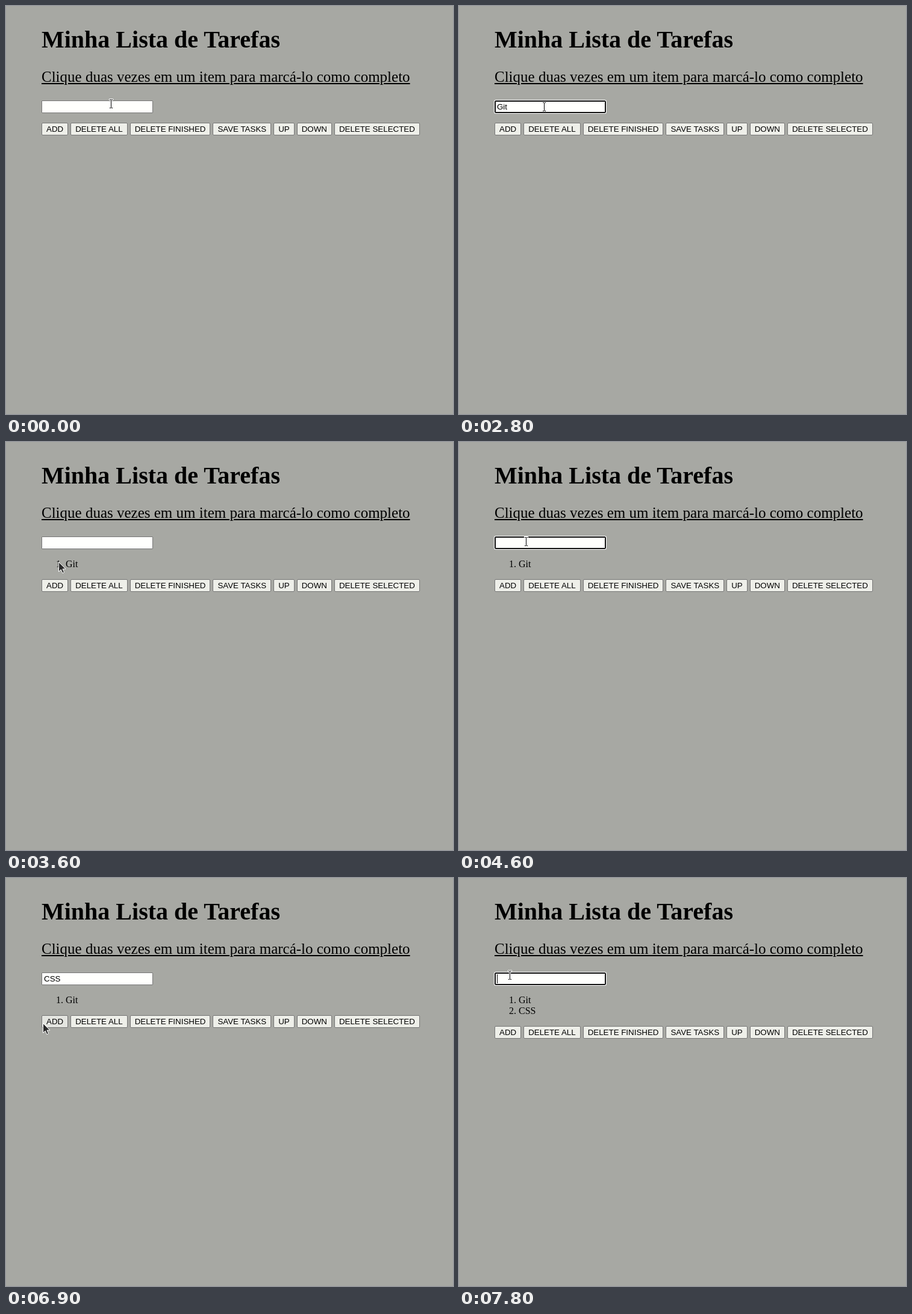
An HTML page for the animation above (8 s loop, 742x678 px).

```html
<!DOCTYPE html>
<html lang="pt-BR">
<head>
<meta charset="utf-8">
<title>Minha Lista de Tarefas</title>
<style>
  html, body { margin: 0; width: 100%; height: 100%; overflow: hidden; background: #a7a8a3; }
  body { position: relative; color: #000; font: 16px/18px "Liberation Serif", serif; }
  h1, .hint, .app, svg { position: absolute; margin: 0; white-space: nowrap; }
  h1 { left: 59px; top: 32px; font-size: 40px; line-height: 47px; }
  .hint { left: 59px; top: 104px; font-size: 25px; line-height: 28px; text-decoration: underline; }
  .app { left: 59px; top: 157px; }
  .field, .button {
    box-sizing: border-box; height: 21px; border: 1px solid #767676;
    font: 13.3333px/15px "Liberation Sans", sans-serif;
  }
  .field { position: relative; width: 185px; padding: 2px 3px; background: #fffffd; border-radius: 1px; }
  .field.focus { border-color: #101010; border-radius: 2px; box-shadow: inset 0 0 0 1px #101010; }
  .field.focus.halo { box-shadow: inset 0 0 0 1px #101010, 0 0 0 1px #fff; }
  .caret { position: absolute; top: 2px; width: 1px; height: 15px; background: #000; }
  ol { margin: 16px 0; padding-left: 40px; }
  .row { display: flex; gap: 4px; }
  .button { padding: 2px 7px; background: #eeefe9; border-radius: 2px; }
  .button.hover { background: #e4e5e0; }
  svg { left: 0; top: 0; overflow: visible; }
</style>
</head>
<body>
<h1>Minha Lista de Tarefas</h1>
<p class="hint">Clique duas vezes em um item para marcá-lo como completo</p>
<div class="app">
  <div class="field"><span class="typed"></span><i class="caret"></i></div>
  <ol></ol>
  <div class="row"></div>
</div>
<svg width="742" height="678">
  <g id="beam" shape-rendering="crispEdges">
    <path fill="#fff" d="M-3-8h7v3h-2v11h2v3h-7v-3h2v-11h-2z"/>
    <path fill="#000" d="M-2-7h2v1h1v-1h2v1h-2v13h2v1h-2v-1h-1v1h-2v-1h2v-13h-2z"/>
  </g>
  <path id="arrow" fill="#2b2b2b" stroke="#fff" d="M.5.5V16.5L4.2 13 6.8 18.8 9.6 17.6 7 12H12Z"/>
</svg>
<script>
const LOOP = 8000;
const find = selector => document.querySelector(selector);
const field = find('.field'), typed = find('.typed'), caret = find('.caret');
const list = find('ol'), row = find('.row');
const cursors = { beam: find('#beam'), arrow: find('#arrow') };

for (const label of ['ADD', 'DELETE ALL', 'DELETE FINISHED', 'SAVE TASKS', 'UP', 'DOWN', 'DELETE SELECTED']) {
  const button = document.createElement('div');
  button.className = 'button';
  button.textContent = label;
  row.append(button);
}
const addButton = row.firstChild;

// Every track holds its value until the next time.
const pointer = [
  [0, 'beam', 174, 162], [400, 'beam', 141, 167],
  [3000, 'beam', 136, 170], [3100, 'arrow', 115, 184], [3200, 'arrow', 94, 196],
  [3300, 'arrow', 87, 199], [3700, 'arrow', 92, 188], [3800, 'arrow', 102, 163],
  [3900, 'beam', 111, 164], [4100, 'beam', 111, 163], [4500, 'beam', 111, 165],
  [6200, 'arrow', 87, 184], [6300, 'arrow', 63, 205], [6400, 'arrow', 56, 222],
  [6500, 'arrow', 57, 235], [6600, 'arrow', 60, 240], [6700, 'arrow', 61, 241],
  [7100, 'arrow', 63, 233], [7200, 'arrow', 68, 214], [7300, 'arrow', 76, 190],
  [7400, 'beam', 82, 168], [7500, 'beam', 84, 161], [7600, 'beam', 84, 159],
  [7800, 'beam', 84, 161]
];
const text = [
  [0, ''], [1900, 'G'], [2100, 'Gi'], [2200, 'Git'], [3500, ''],
  [5300, 'CS'], [5400, 'CSS'], [7000, '']
];
const focus = [
  [0, ''], [400, 'focus'], [1000, 'focus halo'], [3400, ''],
  [4100, 'focus halo'], [6900, ''], [7500, 'focus halo']
];
const caretOn = [
  [0, false], [400, true], [1000, false], [1800, true], [2800, false],
  [4100, true], [4600, false], [5300, true], [6000, false], [7500, true]
];
const tasks = [[0], [3500, 'Git'], [7000, 'Git', 'CSS']];

const at = (track, time) => track.findLast(([start]) => start <= time).slice(1);

function draw(time) {
  const [kind, x, y] = at(pointer, time);
  for (const name in cursors) cursors[name].style.display = name === kind ? '' : 'none';
  cursors[kind].setAttribute('transform', `translate(${x} ${y})`);

  typed.textContent = at(text, time)[0];
  field.className = 'field ' + at(focus, time)[0];
  caret.hidden = !at(caretOn, time)[0];
  caret.style.display = caret.hidden ? 'none' : '';
  caret.style.left = 3 + Math.floor(typed.getBoundingClientRect().width) + 'px';

  const items = at(tasks, time);
  if (list.children.length !== items.length) {
    list.replaceChildren(...items.map(item => {
      const entry = document.createElement('li');
      entry.textContent = item;
      return entry;
    }));
  }

  const box = addButton.getBoundingClientRect();
  const over = x >= box.left && x < box.right && y >= box.top && y < box.bottom;
  addButton.classList.toggle('hover', over);
}

const begin = performance.now();
function tick() {
  draw((performance.now() - begin) % LOOP);
  requestAnimationFrame(tick);
}
tick();
</script>
</body>
</html>
```
